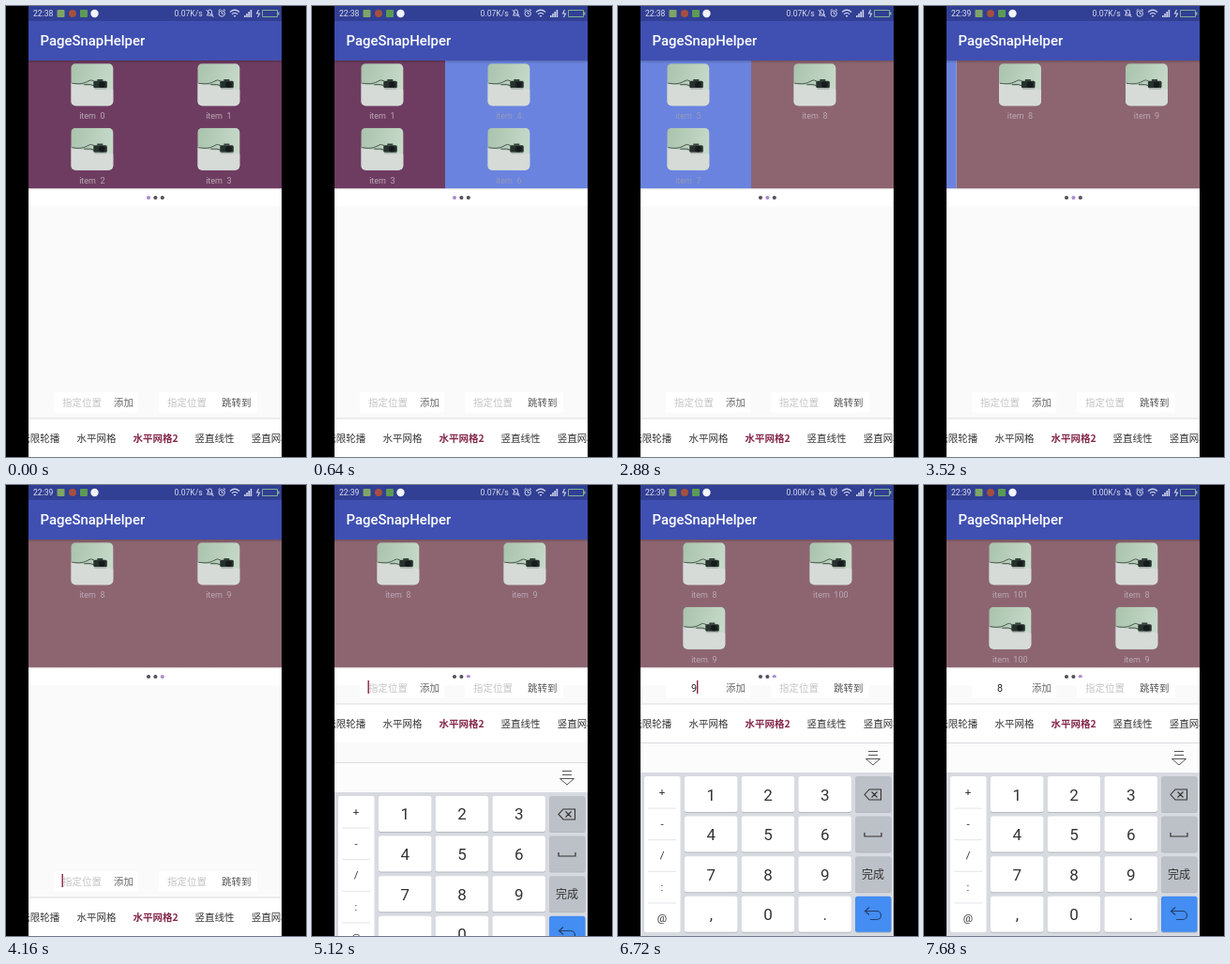
These frames come from a looping animation (320x480 px, 8 s). An HTML page with a canvas:

```html
<!DOCTYPE html>
<html lang="zh-CN">
<head>
<meta charset="utf-8">
<title>PageSnapHelper</title>
<style>
html, body { margin: 0; width: 100%; height: 100%; overflow: hidden; background: #000; }
canvas { display: block; width: 320px; height: 480px; }
</style>
</head>
<body>
<canvas id="stage"></canvas>
<script>
const canvas = document.getElementById('stage');
const c = canvas.getContext('2d');
const dpr = window.devicePixelRatio || 1;
canvas.width = 320 * dpr;
canvas.height = 480 * dpr;

const STEP = 320, LOOP = 8000;
const LEFT = 24, WIDTH = 270, PAGE_TOP = 58, PAGE_BOTTOM = 194.6;
const SANS = 'Roboto, "Noto Sans CJK SC", "Noto Sans CJK", sans-serif';
const CJK = '"Noto Sans CJK SC", "Noto Sans CJK", sans-serif';
const PAGE_COLORS = ['#6e3c61', '#6a83df', '#8d6571'];

function rect(x, y, w, h, color) {
  c.fillStyle = color;
  c.fillRect(x, y, w, h);
}

function round(x, y, w, h, r, color) {
  c.fillStyle = color;
  c.beginPath();
  c.roundRect(x, y, w, h, r);
  c.fill();
}

function dot(x, y, r, color) {
  c.fillStyle = color;
  c.beginPath();
  c.arc(x, y, r, 0, Math.PI * 2);
  c.fill();
}

function poly(points, color) {
  c.fillStyle = color;
  c.beginPath();
  points.forEach(p => c.lineTo(...p));
  c.fill();
}

function stroke(path, color, width = 1) {
  c.strokeStyle = color;
  c.lineWidth = width;
  c.stroke(new Path2D(path));
}

function text(str, x, y, size, color, { align = 'left', weight = 400, family = SANS } = {}) {
  c.font = `${weight} ${size}px ${family}`;
  c.textAlign = align;
  c.fillStyle = color;
  c.fillText(str, x, y);
}

function shade(y, h, alpha) {
  const g = c.createLinearGradient(0, y, 0, y + h);
  g.addColorStop(0, `rgba(0,0,0,${alpha})`);
  g.addColorStop(1, 'rgba(0,0,0,0)');
  rect(LEFT, y, WIDTH, h, g);
}

function statusBar(t) {
  rect(LEFT, 0, WIDTH, 16, '#313f94');
  text(t < 3200 ? '22:38' : '22:39', 29, 11, 8.6, '#dfe2f0');
  round(54.5, 4, 8, 8, 1, '#7fa566');
  dot(71, 8, 4, '#a5503f');
  round(79, 4, 8, 8, 1, '#5c9a55');
  dot(94.5, 8, 4.2, '#f2f4fa');
  text(t < 5760 ? '0.07K/s' : '0.00K/s', 179.6, 11, 8.6, '#d5d9ec');

  const ink = '#cdd2ea';
  stroke('M214.5 10h6l-1-2v-2a2 2 0 0 0-4 0v2zM213.5 4l8 8', ink);
  stroke('M227 8a3.2 3.2 0 1 0 6.4 0a3.2 3.2 0 1 0-6.4 0M230.2 6v2.3h1.6M226.5 5l2-1.6M234 5l-2-1.6', ink);
  stroke('M239 6.5q5-4.5 10 0M241 8.7q3-2.7 6 0', ink, 1.2);
  poly([[244, 12], [242.5, 10], [245.5, 10]], ink);
  [2, 4, 6, 8].forEach((h, i) => rect(254 + i * 2.2, 12 - h, 1.6, h, ink));
  stroke('M269.5 4l-2 4h3l-2 4', ink, 1.1);
  stroke('M273.5 4.5h16v7h-16z', '#7fae92');
  rect(290, 6.5, 1.5, 3, '#7fae92');
}

function thumbnail(x, y) {
  c.save();
  c.translate(x, y);
  c.beginPath();
  c.roundRect(0, 0, 45, 45, 5);
  c.clip();
  const wall = c.createLinearGradient(0, 0, 46, 12);
  wall.addColorStop(0, '#a9c3ac');
  wall.addColorStop(1, '#c6d9c9');
  rect(0, 0, 46, 46, wall);
  poly([[0, 21], [46, 28], [46, 46], [0, 46]], '#d6dbd8');
  stroke('M1 21C8 22 12 22 17 19.5S21 17.5 25 19M14 22.5q7-1 12 1.5', '#46524b', 1);
  round(24, 18.5, 14.5, 7.5, 1.5, '#27312e');
  rect(28, 16.8, 6, 2, '#35403b');
  dot(33, 22.5, 3.3, '#151b1b');
  rect(25, 26.2, 13, 1.3, '#a7b1aa');
  c.restore();
}

function page(index, items, x) {
  rect(x, PAGE_TOP, WIDTH, PAGE_BOTTOM - PAGE_TOP, PAGE_COLORS[index]);
  items.forEach((n, i) => {
    const px = x + 45.3 + (i % 2) * 135;
    const py = 61.2 + (i >> 1) * 68.5;
    thumbnail(px, py);
    text(`item\u00a0\u00a0${n}`, px + 22.5, py + 58.8, 9, index === 1 ? '#939bb8' : '#b9a9b4', { align: 'center' });
  });
}

// Snap deceleration: distance still left to the resting page.
function remaining(t, start) {
  if (t < start) return WIDTH;
  const d = 118 * Math.exp(-(t - start) / 266);
  return d < 1 ? 0 : d;
}

function lastPage(t) {
  if (t >= 7680) return [101, 8, 100, 9];
  return t >= 6400 ? [8, 100, 9] : [8, 9];
}

function pager(t) {
  const first = remaining(t, 640), second = remaining(t, 2880);
  const scroll = 2 * WIDTH - first - second;
  c.save();
  c.beginPath();
  c.rect(LEFT, PAGE_TOP, WIDTH, PAGE_BOTTOM - PAGE_TOP);
  c.clip();
  [[0, 1, 2, 3], [4, 5, 6, 7], lastPage(t)].forEach((items, i) => {
    page(i, items, LEFT + i * WIDTH - scroll);
  });
  c.restore();
  shade(PAGE_TOP, 3, 0.2);

  rect(LEFT, PAGE_BOTTOM, WIDTH, 213 - PAGE_BOTTOM, '#fff');
  shade(PAGE_BOTTOM, 1.5, 0.1);
  const active = (first === 0) + (second === 0);
  for (let i = 0; i < 3; i++) {
    dot(152 + i * 7.4, 204, 2.1, i === active ? '#a98bd0' : '#55505a');
  }
}

function typed(t) {
  if (t >= 7360) return '8';
  return t >= 6080 && t < 7040 ? '9' : '';
}

function controls(t, lift) {
  const y = -lift, cjk = { family: CJK }, value = typed(t);
  rect(51, 411 + y, 90, 21.5, '#fff');
  rect(163, 411 + y, 105, 21.5, '#fff');
  if (value) text(value, 81, 425.5 + y, 10.8, '#222', { align: 'center' });
  else text('指定位置', 60, 425.5 + y, 10.5, '#c4c4c4', cjk);
  if (t >= 4160 && t !== 4800 && t < 7680) rect(value ? 84 : 59.5, 414 + y, 1.4, 14, '#8b2149');
  text('添加', 115, 425.5 + y, 10.5, '#666', cjk);
  text('指定位置', 172, 425.5 + y, 10.5, '#c4c4c4', cjk);
  text('跳转到', 230, 425.5 + y, 10.5, '#555', cjk);

  rect(LEFT, 439 + y, WIDTH, 41, '#fff');
  rect(LEFT, 438.5 + y, WIDTH, 1, '#dedede');
  [['无限轮播', 15.3], ['水平网格', 75.4], ['竖直线性', 201.5], ['竖直网格', 261.7]].forEach(([label, x]) =>
    text(label, x, 463.8 + y, 10.5, '#333', cjk));
  text('水平网格2', 135.4, 463.8 + y, 10.5, '#85284a', { family: CJK, weight: 700 });
}

function key(x, y, w, color) {
  round(x, y + 1, w, 38, 2.5, '#b4b8bf');
  round(x, y, w, 38, 2.5, color);
}

function keyboard(shift) {
  c.save();
  c.translate(0, shift);
  rect(LEFT, 274, WIDTH, 32, '#fcfcfd');
  rect(LEFT, 274, WIDTH, 1, '#dcdde0');
  stroke('M267 283.5h10M267 287.5h10M264.5 291.5h15l-7.5 6.5z', '#555');
  rect(LEFT, 306, WIDTH, 174, '#d7dae0');

  round(28, 310, 38.5, 166, 2.5, '#fff');
  ['+', '-', '/', ':', '@'].forEach((s, i) => {
    const y = 310 + i * 33.6;
    if (i) rect(32, y, 30, 1, '#e3e4e7');
    text(s, 47, y + 21, 11.5, '#333', { align: 'center' });
  });

  const rowY = i => 310 + i * 42.6;
  ['123', '456', '789', ',0.'].forEach((row, r) => {
    [...row].forEach((s, col) => {
      const x = 71 + col * 60.7;
      key(x, rowY(r), 56.5, '#fff');
      text(s, x + 28.3, rowY(r) + 25.5, 17, '#333', { align: 'center' });
    });
    key(253, rowY(r), 38.5, r === 3 ? '#438df3' : '#bcc0c7');
  });
  stroke('M263 329.5l5-5.5h12.5v11h-12.5zM270.5 326.5l6 6m0-6l-6 6', '#333', 1.1);
  stroke('M263 370v4h18v-4', '#333', 1.2);
  text('完成', 272, 418.8, 12, '#333', { align: 'center', family: CJK });
  stroke('M268 449.5l-4.5 4 4.5 4M263.5 453.5h12.5a4.5 4.5 0 0 1 0 9h-7', '#24406b', 1.2);
  c.restore();
}

function draw(t) {
  c.setTransform(dpr, 0, 0, dpr, 0, 0);
  rect(0, 0, 320, 480, '#000');
  c.save();
  c.beginPath();
  c.rect(LEFT, 0, WIDTH, 480);
  c.clip();
  rect(LEFT, 0, WIDTH, 480, '#fafafa');
  statusBar(t);
  rect(LEFT, 16, WIDTH, PAGE_TOP - 16, '#3f50b2');
  text('PageSnapHelper', 36.5, 42, 14.9, '#fff', { weight: 500 });
  pager(t);
  const open = t >= 4800;
  controls(t, open ? 206 : 0);
  if (open) keyboard(t >= 5440 ? 0 : 100 * Math.exp(-(t - 4800) / 205));
  c.restore();
}

function tick(now) {
  draw(Math.floor((now % LOOP) / STEP) * STEP);
  requestAnimationFrame(tick);
}
draw(0);
requestAnimationFrame(tick);
</script>
</body>
</html>
```
